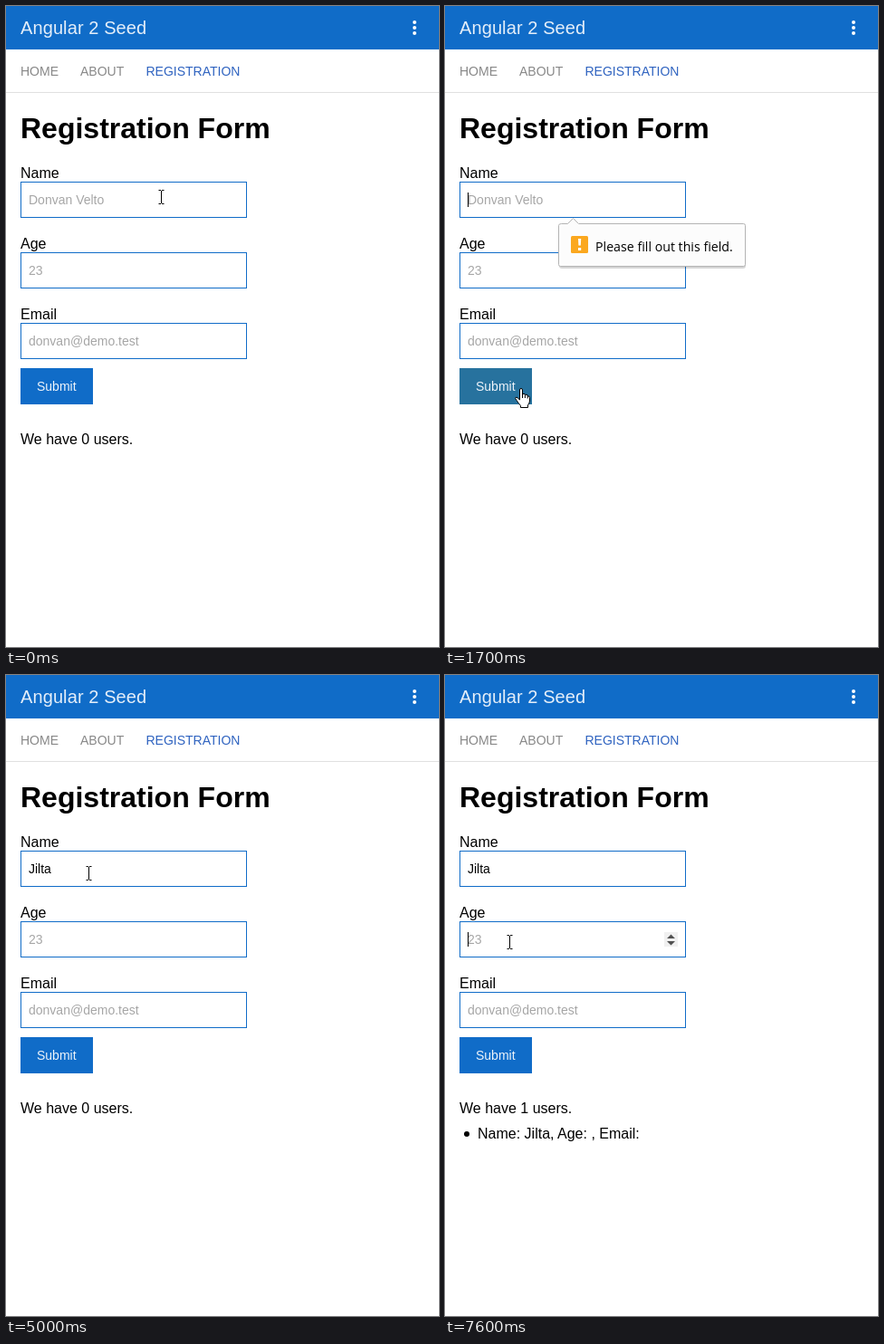
Animation, 478 px wide and 708 px high, one loop 8000 ms. Source, as an HTML page:

```html
<!DOCTYPE html>
<html lang="en">
<head>
<meta charset="utf-8">
<title>Registration form</title>
<style>
  html, body { margin: 0; width: 100%; height: 100%; overflow: hidden; background: #fff; }
  svg { display: block; width: 478px; height: 708px; font: 16px "Liberation Sans", Arial, sans-serif; }
  .small { font-size: 14px; }
  .hint { font-size: 14px; fill: #a6a6a6; }
  .nav { font-size: 14px; fill: #888; }
  .field { fill: #fff; stroke: #106cc8; }
</style>
</head>
<body>
<svg viewBox="0 0 478 708">
  <rect width="478" height="708" fill="#fff"/>
  <rect width="478" height="48" fill="#106cc8"/>
  <text x="16" y="31" font-size="20" letter-spacing=".1" fill="#e4eef9">Angular 2 Seed</text>
  <g fill="#fff"><circle cx="451" cy="18" r="2"/><circle cx="451" cy="24" r="2"/><circle cx="451" cy="30" r="2"/></g>

  <text class="nav" x="16" y="77">HOME</text>
  <text class="nav" x="82" y="77">ABOUT</text>
  <text class="nav" x="154.5" y="77" style="fill:#2f63c0">REGISTRATION</text>
  <rect y="95" width="478" height="1" fill="#e0e0e0"/>

  <text x="16" y="146" font-size="32" font-weight="700">Registration Form</text>

  <text x="16" y="190">Name</text>
  <rect class="field" x="16.5" y="194.5" width="249" height="39"/>
  <text class="hint" id="nameHint" x="25" y="219">Donvan Velto</text>
  <text class="small" id="name" x="25" y="219"></text>

  <text x="16" y="268">Age</text>
  <rect class="field" x="16.5" y="272.5" width="249" height="39"/>
  <text class="hint" x="25" y="297">23</text>
  <g id="spinner">
    <rect x="242" y="284" width="15" height="16" fill="#f0f0f0"/>
    <path d="M245 291l4.5-4.5 4.5 4.5zM245 294h9l-4.5 4.5z" fill="#505050"/>
  </g>

  <text x="16" y="346">Email</text>
  <rect class="field" x="16.5" y="350.5" width="249" height="39"/>
  <text class="hint" x="25" y="375">donvan@demo.test</text>

  <rect id="button" x="16" y="400" width="80" height="40"/>
  <rect id="ring" x="15.75" y="399.75" width="80.5" height="40.5" rx="1" fill="none" stroke="#4a8be0" stroke-width="1.5"/>
  <text class="small" x="34" y="425" fill="#eef4fa">Submit</text>

  <text id="count" x="16" y="484"></text>
  <g id="list">
    <circle cx="24" cy="507" r="3"/>
    <text id="entry" x="36" y="512"></text>
  </g>

  <rect id="caret" width="1" height="16"/>

  <g id="tip">
    <rect x="126" y="242" width="206" height="48" rx="3" fill="#000" opacity=".16"/>
    <path d="M128.5 240.5H135.5L141.5 234.5L147.5 240.5H329.5Q331.5 240.5 331.5 242.5V285.5Q331.5 287.5 329.5 287.5H127.5Q125.5 287.5 125.5 285.5V242.5Q125.5 240.5 128.5 240.5Z" fill="#fcfcfc" stroke="#b4b4b4"/>
    <rect x="139" y="254" width="19" height="19" rx="1.5" fill="#fba81f"/>
    <path d="M147 257h3.2l-.4 7.5h-2.4zM147 267h3.2v3h-3.2z" fill="#fff"/>
    <text x="166" y="271" style="font:14.2px 'Open Sans','Noto Sans',sans-serif">Please fill out this field.</text>
  </g>

  <path id="beam" d="M-3 -7.5h2.5M.5 -7.5h2.5M0 -7V7M-3 7.5h2.5M.5 7.5h2.5" fill="none" stroke="#000"/>
  <path id="arrow" d="M.5 .7V16.5L4.2 13L6.8 18.5L9 17.5L6.5 12H11.5Z" fill="#fff" stroke="#000"/>
  <g id="hand" fill="#fff" stroke="#000">
    <path d="M5.5 2Q5.5 .5 7 .5T8.5 2V7.3Q8.6 6.3 10 6.3T11.4 7.8Q11.6 7 13 7.2T14.2 9Q16.5 8.4 16.5 10.5V14Q16.5 16 14.5 19V21.5H6.5V19.5Q4 16.5 2 13.5Q0 11 1 10.3Q2.5 9.5 5.5 13Z"/>
    <path d="M8.5 7V11M11.4 8V11M14.2 9V11.5" fill="none"/>
  </g>
</svg>
<script>
const LOOP = 8000, NAME = "Jilta";
const el = {};
for (const node of document.querySelectorAll("[id]")) el[node.id] = node;

// pointer: [time, shape, x, y]
const pointer = [
  [0, "beam", 171.5, 211], [100, "beam", 167.5, 217], [200, "beam", 162.5, 224],
  [700, "arrow", 285, 262], [800, "arrow", 205, 402], [900, "hand", 78, 425], [1000, "hand", 77, 429],
  [1700, "hand", 77, 422], [1800, "hand", 78, 404], [1900, "beam", 85.5, 366],
  [2000, "beam", 88.5, 300], [2100, "arrow", 90, 242], [2200, "beam", 91.5, 219],
  [5600, "beam", 90.5, 226], [5700, "beam", 84.5, 291], [5800, "beam", 76.5, 368],
  [5900, "hand", 62, 414], [6000, "hand", 61, 428],
  [6700, "hand", 61, 420], [6800, "beam", 67.5, 376], [6900, "beam", 69.5, 334],
  [7000, "beam", 70.5, 302], [7100, "beam", 71.5, 282], [7200, "beam", 71.5, 272],
  [7400, "beam", 71.5, 281], [7500, "beam", 71.5, 289], [7600, "beam", 71.5, 295]
];
const caretFlips = [1300, 1800, 2200, 2900, 3300, 5000, 5600, 6200, 7500];
const keyTimes = [3300, 3600, 3800, 4000, 4500];

const passed = (times, t) => times.filter(k => k <= t).length;
const show = (node, on) => node.setAttribute("visibility", on ? "visible" : "hidden");
const place = (node, x, y) => node.setAttribute("transform", `translate(${x} ${y})`);
const write = (node, s) => { if (node.textContent !== s) node.textContent = s; };

el.entry.textContent = `Name: ${NAME}, Age: , Email:`;

function draw(t) {
  const [, shape, x, y] = pointer.filter(p => p[0] <= t).pop();
  for (const s of ["beam", "arrow", "hand"]) show(el[s], s === shape);
  place(el[shape], x, y);

  const typed = NAME.slice(0, passed(keyTimes, t));
  write(el.name, typed);
  show(el.nameHint, !typed);

  const inAge = t >= 7500;
  const width = typed && !inAge ? el.name.getComputedTextLength() : 0;
  place(el.caret, Math.round(25 + width), inAge ? 284 : 206);
  show(el.caret, passed(caretFlips, t) % 2);

  show(el.spinner, shape === "beam" && y >= 272 && y < 312);
  el.button.setAttribute("fill", shape === "hand" ? "#27729e" : "#106cc8");

  const sent = t >= 6200;
  show(el.ring, sent && t < 7500);
  show(el.list, sent);
  write(el.count, `We have ${sent ? 1 : 0} users.`);

  show(el.tip, t >= 1300 && t < 3300);
  el.tip.setAttribute("opacity", Math.min(1, (Math.floor(t / 100) - 12) / 3));
}

const start = performance.now();
function tick() {
  draw((performance.now() - start) % LOOP);
  requestAnimationFrame(tick);
}
tick();
</script>
</body>
</html>
```
